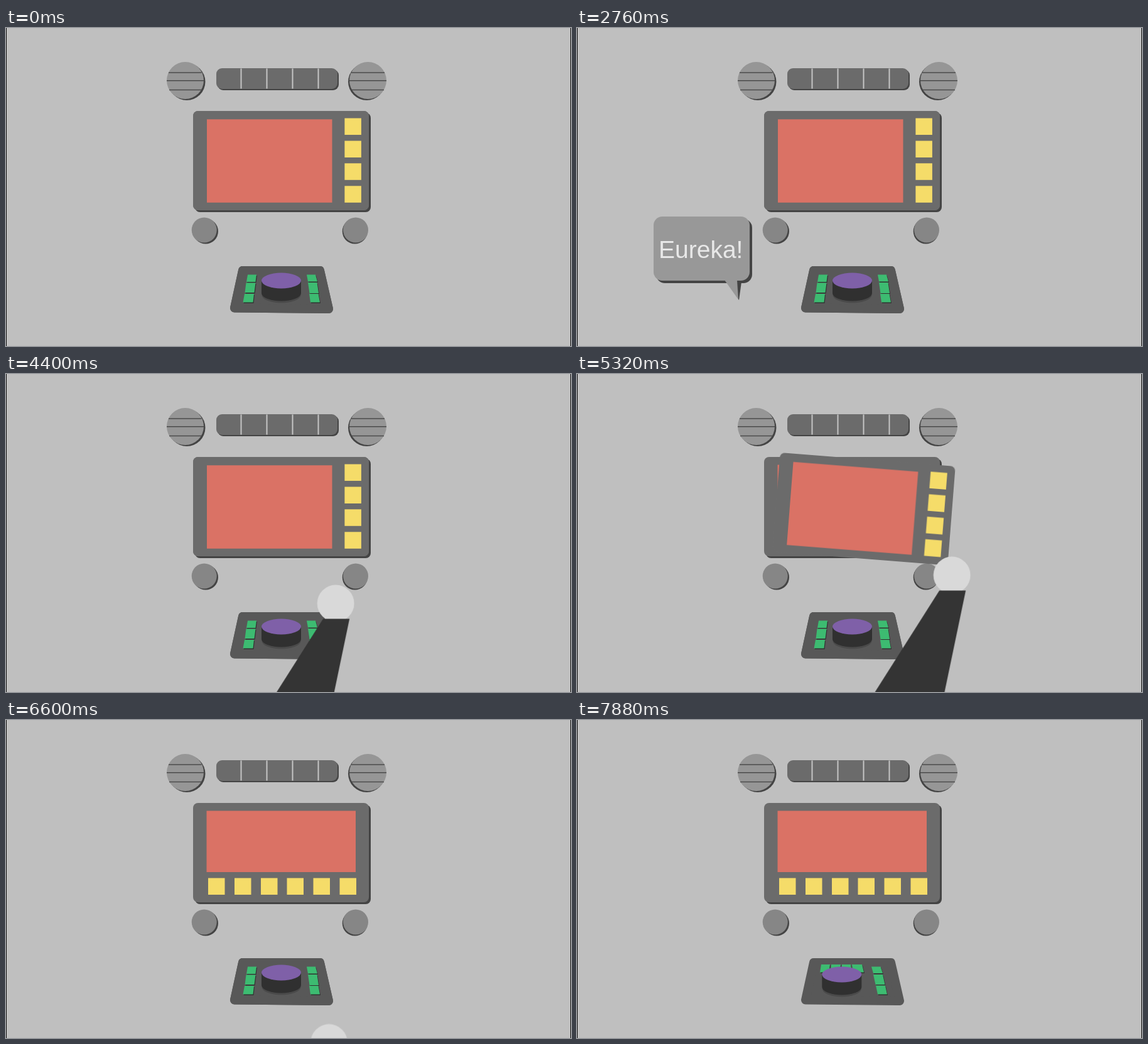
Write an HTML page without scripts that moves like this. It is 900 px wide and 506 px high and loops after 8000 ms.

```html
<!DOCTYPE html>
<html lang="en">
<head>
<meta charset="utf-8">
<title>Swappable dashboard</title>
<style>
  html, body { margin: 0; width: 100%; height: 100%; overflow: hidden; background: #bfbfbf; }
  svg { display: block; width: 100%; height: 100%; }

  .shade { fill: #444; }
  .vent { fill: #969696; }
  .slats { stroke: #4b4b4b; stroke-width: 1.5; }
  .body { fill: #6b6b6b; }
  .red { fill: #da7265; }
  .yellow { fill: #f5dc69; }
  .dial { fill: #868686; }
  .panel { fill: #585858; stroke: #585858; stroke-width: 14; stroke-linejoin: round; }
  .keys { fill: #3dbb71; }
  .keyshade { fill: #303030; }

  .bubble, .screen, .console, .hand { animation: 8s linear infinite; }
  .bubble { animation-name: speak; transform-origin: 258px 433px; }
  .screen { animation-name: pull-screen; transform-origin: 586px 305px; }
  .console { animation-name: pull-console; transform-origin: 520px 440px; }
  .hand { animation-name: reach; }

  @keyframes speak {
    0% { transform: scale(0); }
    23.5% { transform: scale(0); animation-timing-function: cubic-bezier(.3, 1.5, .6, 1); }
    28.5%, 41% { transform: scale(1); animation-timing-function: cubic-bezier(.5, -.5, .7, .3); }
    46%, 100% { transform: scale(0); }
  }

  @keyframes pull-screen {
    0%, 62.5% { transform: translate(0, 0) rotate(0deg); animation-timing-function: ease-in; }
    66.5% { transform: translate(11px, 15px) rotate(4.5deg); animation-timing-function: cubic-bezier(.5, .1, .8, .8); }
    74.5%, 100% { transform: translate(640px, 78px) rotate(25deg); }
  }

  @keyframes pull-console {
    0%, 87% { transform: translate(0, 0) rotate(0deg); animation-timing-function: cubic-bezier(.5, 0, .8, .7); }
    92.5%, 100% { transform: translate(590px, -70px) rotate(25deg); }
  }

  @keyframes reach {
    0%, 51.5% { transform: translate(486px, 545px); animation-timing-function: ease-in; }
    55% { transform: translate(525px, 365.5px); animation-timing-function: ease-out; }
    59%, 61.5% { transform: translate(552px, 273px); animation-timing-function: ease-in-out; }
    66.5% { transform: translate(597px, 320px); animation-timing-function: cubic-bezier(.5, .1, .8, .8); }
    74.5% { transform: translate(1226px, 383px); animation-timing-function: step-end; }
    81.5% { transform: translate(512px, 545px); }
    82.5% { transform: translate(514.5px, 514px); animation-timing-function: ease-out; }
    85.5%, 87% { transform: translate(520px, 440px); animation-timing-function: cubic-bezier(.5, 0, .8, .7); }
    92.5% { transform: translate(1110px, 370px); animation-timing-function: step-end; }
    93%, 100% { transform: translate(486px, 545px); }
  }
</style>
</head>
<body>
<svg viewBox="0 0 900 506" preserveAspectRatio="none">
  <defs>
    <circle id="vent" r="29.5"/>
    <circle id="dial" r="20"/>
    <rect id="bar" x="335" y="64" width="193" height="33" rx="9"/>
    <rect id="body" x="298" y="132" width="280" height="158" rx="8"/>
    <rect id="key" width="26.5" height="26.5"/>
    <rect id="balloon" x="122" y="300" width="153" height="102" rx="14"/>
    <path id="panel" d="M377 386H500L514 447L364 445.5Z"/>
    <path id="side-keys" d="M385 392.5h14l-1.5 11.5h-14.5zM382.5 405.5h15l-2 15.5h-15zM380 423h15l-1.5 13.5h-16z
      M479 392.5h14l3 11h-15zM481 405h14.5l2.5 17h-14.5zM483 423h14.5l2.5 13.5h-15z"/>
    <path id="top-keys" d="M389 389h14l-1.5 12.5h-14.5zM405 389h15l-1 12.5h-15zM422 389h14l2 12.5h-16.5zM438 389h16l3 12.5h-17z
      M469 392.5h14.5l3.5 10.5h-15zM472 405h15l3.5 16h-15zM476 422.5h15l3 14h-15z"/>
    <g id="knob">
      <ellipse cy="23" rx="31" ry="12.5" fill="#4a4a4a"/>
      <path d="M-31.5 0V20A31.5 12.5 0 0 0 31.5 20V0Z" fill="#303030"/>
      <ellipse rx="31.5" ry="12.5" fill="#7f60a8"/>
    </g>
  </defs>

  <rect width="900" height="506" fill="#bfbfbf"/>

  <!-- vents -->
  <use href="#vent" x="288" y="85.5" class="shade"/>
  <use href="#vent" x="285.5" y="83.5" class="vent"/>
  <path class="slats" d="M259 71H311.5M256 83.7H315M260 98.5H311.5"/>
  <use href="#vent" x="574.5" y="85.5" class="shade"/>
  <use href="#vent" x="576.5" y="83.5" class="vent"/>
  <path class="slats" d="M550 71H603M547 83.7H606M551 98.5H602"/>

  <!-- button bar -->
  <use href="#bar" x="2" y="2" class="shade"/>
  <use href="#bar" class="body"/>
  <path d="M374.5 64.5V96.5m41-32v32m41-32v32m41-32v32" stroke="#c6c6c6" stroke-width="2"/>

  <!-- dials -->
  <use href="#dial" x="318" y="323.5" class="shade"/>
  <use href="#dial" x="315.7" y="321.5" class="dial"/>
  <use href="#dial" x="555.7" y="323.5" class="shade"/>
  <use href="#dial" x="557" y="321.5" class="dial"/>

  <!-- wide layout beneath -->
  <use href="#body" x="3" y="3" class="shade"/>
  <use href="#body" class="body"/>
  <rect class="red" x="319.5" y="144.5" width="237.5" height="97.5"/>
  <g class="yellow">
    <use href="#key" x="322" y="251.5"/>
    <use href="#key" x="364" y="251.5"/>
    <use href="#key" x="406" y="251.5"/>
    <use href="#key" x="447.5" y="251.5"/>
    <use href="#key" x="489.5" y="251.5"/>
    <use href="#key" x="531.5" y="251.5"/>
  </g>
  <use href="#panel" class="panel"/>
  <use href="#top-keys" x="1" y="1.5" class="keyshade"/>
  <use href="#top-keys" class="keys"/>
  <use href="#knob" x="421.8" y="405"/>

  <!-- removable console -->
  <g class="console">
    <use href="#panel" class="panel"/>
    <use href="#side-keys" x="1" y="1.5" class="keyshade"/>
    <use href="#side-keys" class="keys"/>
    <use href="#knob" x="438.5" y="402"/>
  </g>

  <!-- removable screen -->
  <g class="screen">
    <use href="#body" class="body"/>
    <rect class="red" x="320" y="145.3" width="199.5" height="132.5"/>
    <g class="yellow">
      <use href="#key" x="539.4" y="143.5"/>
      <use href="#key" x="539.4" y="179.5"/>
      <use href="#key" x="539.4" y="215.3"/>
      <use href="#key" x="539.4" y="251.3"/>
    </g>
  </g>

  <g class="bubble">
    <use href="#balloon" x="4" y="4" class="shade"/>
    <path class="shade" d="M240 404H262L258 433Z"/>
    <use href="#balloon" fill="#989898"/>
    <path d="M235 401H255L257 432Z" fill="#989898"/>
    <text x="130" y="366" font-family="'Liberation Sans', Arial, sans-serif" font-size="39" fill="#e8e8e8">Eureka!</text>
  </g>

  <g class="hand">
    <circle r="29.5" fill="#d9d9d9"/>
    <path d="M-20 24.5H22L-49 364.5H-236Z" fill="#343434"/>
  </g>

  <path d="M.5 0V506M899.5 0V506" stroke="#0c0c0c"/>
</svg>
</body>
</html>
```
